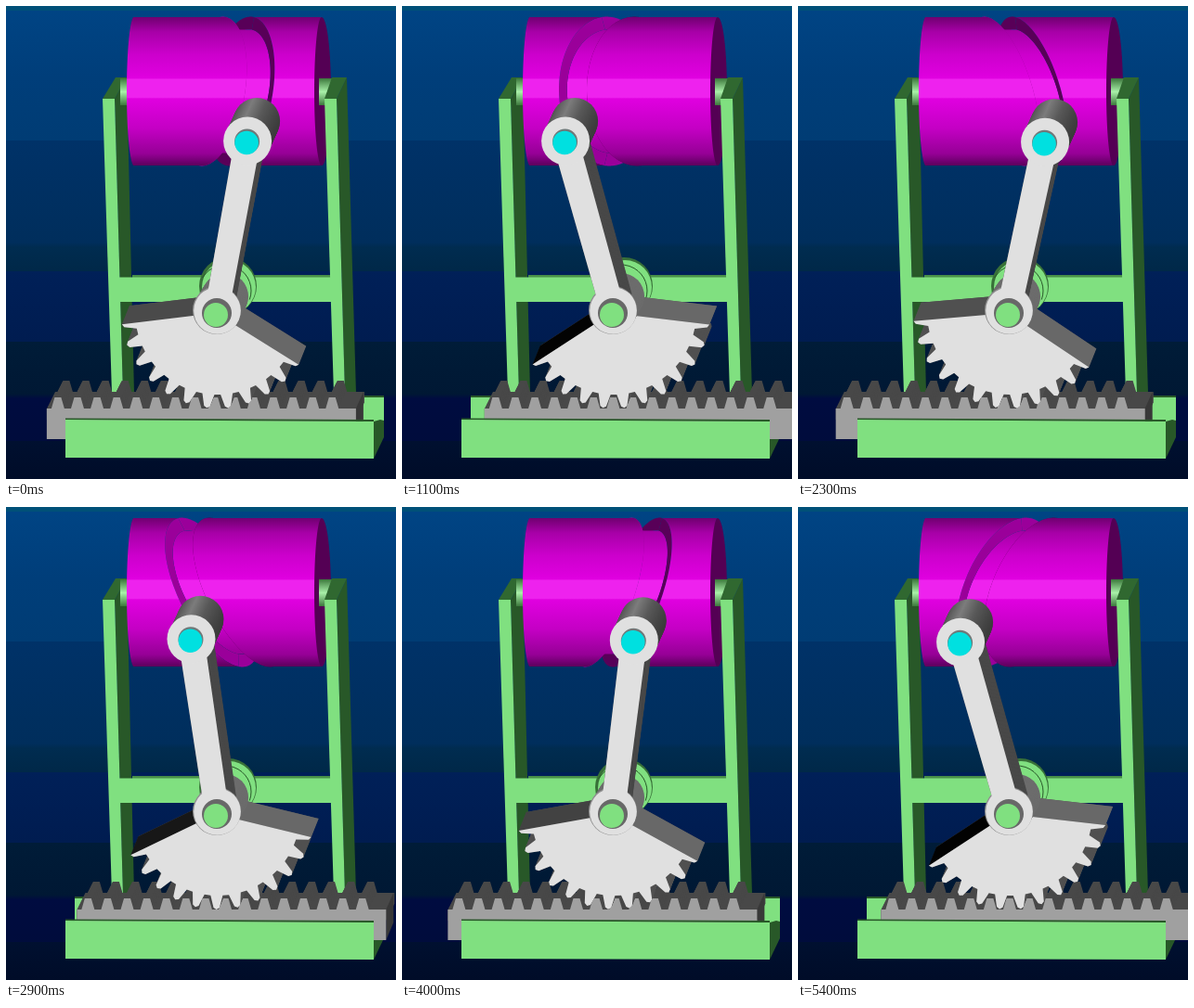
These frames come from a looping animation (420x510 px, 5.5 s). An HTML page with a canvas:

```html
<!DOCTYPE html>
<html lang="en">
<head>
<meta charset="utf-8">
<title>Cylindrical cam and rack</title>
<style>
html, body { margin: 0; width: 100%; height: 100%; overflow: hidden; background: #002850; }
canvas { display: block; }
</style>
</head>
<body>
<canvas width="420" height="510"></canvas>
<script>
const ctx = document.querySelector('canvas').getContext('2d');
const GREEN = '#80e080', DARK_GREEN = '#285828', LIGHT = '#e0e0e0', DARK = '#484848';
const PIVOT = { x: 226, y: 331 }, SECTOR = { x: 228, y: 330 };
const PITCH = 21.1, TOOTH_ANGLE = 12.7;
const rad = deg => deg * Math.PI / 180;
const gray = v => `rgb(${v},${v},${v})`;

function gradient(x0, y0, x1, y1, stops) {
  const g = ctx.createLinearGradient(x0, y0, x1, y1);
  stops.forEach(([at, color]) => g.addColorStop(at, color));
  return g;
}
function poly(points, color) {
  ctx.fillStyle = color;
  ctx.beginPath();
  points.forEach(([x, y]) => ctx.lineTo(x, y));
  ctx.fill();
}
function ellipse(x, y, rx, ry, color) {
  ctx.fillStyle = color;
  ctx.beginPath();
  ctx.ellipse(x, y, rx, ry, 0, 0, 7);
  ctx.fill();
}
const disc = (x, y, r, color) => ellipse(x, y, r, r, color);
const rect = (x, y, w, h, color) => { ctx.fillStyle = color; ctx.fillRect(x, y, w, h); };

// Sweep a shape backwards by (dx, dy) to give it depth.
function extrude(dx, dy, draw) {
  for (let i = 24; i >= 0; i--) {
    ctx.save();
    ctx.translate(dx * i / 24, dy * i / 24);
    draw();
    ctx.restore();
  }
}

const sky = gradient(0, 0, 0, 510, [
  [0, '#005078'], [.01, '#005078'], [.01, '#004484'], [.15, '#003e7a'], [.285, '#003c74'],
  [.285, '#003268'], [.5, '#002e5c'], [.51, '#002c50'], [.56, '#002848'], [.56, '#002058'],
  [.71, '#001c50'], [.71, '#001c38'], [.82, '#001834'], [.83, '#000c40'], [.92, '#000c3c'],
  [.92, '#001030'], [1, '#000c28']]);
const magenta = gradient(0, 12, 0, 172, [
  [0, '#700070'], [.1, '#a800a8'], [.25, '#cc00cc'], [.41, '#e000e0'], [.42, '#ee22ee'],
  [.54, '#ee22ee'], [.55, '#e000e0'], [.75, '#c400c4'], [.92, '#960096'], [1, '#5c005c']]);
const axle = gradient(0, 78, 0, 107, [[0, '#3c783c'], [.5, '#a8f0a8'], [1, '#3c783c']]);

function drawPost(x, topShift, topWidth) {
  const back = x + topShift;
  poly([[x + 13, 100], [back + topWidth, 77], [x + 34, 418], [x + 22, 418]], DARK_GREEN);
  poly([[x, 100], [back, 77], [back + topWidth, 77], [x + 13, 100]], '#306830');
  poly([[x, 100], [x + 13, 100], [x + 22, 418], [x + 10, 418]], GREEN);
}

function drawCrossbar() {
  rect(136, 290, 218, 3, '#489048');
  rect(122, 292.5, 234, 26.5, GREEN);
  disc(239, 302, 31, '#387038');
  disc(240, 303, 29, GREEN);
  ctx.strokeStyle = DARK_GREEN;
  ctx.beginPath();
  ctx.arc(236, 307, 28, rad(-150), rad(20));
  ctx.stroke();
}

function drawCam(phase) {
  const offset = rad(17), horizon = 84, halfGroove = 15;
  const arc = (from, to) => Array.from({ length: 61 }, (_, i) => rad(from + (to - from) * i / 60));
  const front = arc(-horizon, horizon);
  const height = a => 92 + 80 * Math.sin(a) / Math.sin(rad(horizon));
  const center = a => 237 - 8 * Math.cos(a) + 45 * Math.cos(phase - a + offset);
  const lip = (angles, side) => angles.map(a => [center(a) + side * halfGroove, height(a)]);
  const sink = points => points.map(([x, y]) => [232 + (x - 230) * .89, 92 + (y - 92) * .83]);
  const end = x => front.map(a => [x - 8 * Math.cos(a), height(a)]).reverse();
  const wall = (angles, side) => {
    const edge = lip(angles, side);
    poly([...edge, ...sink(edge).reverse()], side < 0 ? '#9a009a' : '#580058');
  };

  // Walls that curl over the far side show above the groove floor.
  for (const angles of [arc(-140, -horizon), arc(horizon, 140)]) {
    wall(angles, 1);
    wall(angles, -1);
  }
  const left = lip(front, -1), right = lip(front, 1);
  poly([...sink(left), ...sink(right).reverse()], magenta);
  wall(front, -1);
  wall(front, 1);
  poly([...left, ...end(138)], magenta);
  ellipse(340, 92, 10, 80, '#540054');
  poly([...right, ...end(340)], magenta);
}

function drawRack(left) {
  const profile = [[left, 434]];
  for (let k = 0; k < 15; k++) {
    const tip = left + 12 + PITCH * k;
    profile.push([tip - 7, 434], [tip - 3.5, 422], [tip + 3.5, 422], [tip + 7, 434]);
  }
  profile.push([left + 333, 434], [left + 333, 446]);
  extrude(9, -18, () => poly([...profile, [left, 446]], DARK));
  poly([[left + 333, 434], [left + 341, 416], [left + 341, 448], [left + 333, 467]], '#383838');
  poly([...profile, [left + 333, 467], [left, 467]], '#a0a0a0');
}

function drawSector(tilt) {
  const turn = tilt + 2.7;
  const at = (deg, r) => [SECTOR.x + r * Math.cos(rad(deg)), SECTOR.y + r * Math.sin(rad(deg))];
  let rim = [];
  for (let k = 0; k < 12; k++) {
    const tip = 20.15 + TOOTH_ANGLE * k + turn;
    rim.push(at(tip - 4.2, 89), at(tip - 1.8, 102), at(tip, 104), at(tip + 1.8, 102), at(tip + 4.2, 89));
  }
  rim = rim.slice(2, -2);
  const hub = [PIVOT.x, PIVOT.y], dx = 8, dy = -20;
  const side = (corner, color) => poly(
    [hub, corner, [corner[0] + dx, corner[1] + dy], [hub[0] + dx, hub[1] + dy]], color);
  extrude(dx, dy, () => poly([hub, ...rim], '#505050'));
  side(rim[rim.length - 1], gray(46 + 2.8 * tilt));
  side(rim[0], gray(104));
  poly([hub, ...rim], LIGHT);
}

function drawArm(x, y) {
  extrude(9, -15, () => disc(227, 328, 25, '#6c6c6c'));
  const dx = x + 1 - 227, dy = y - 328, len = Math.hypot(dx, dy);
  const nx = -dy / len, ny = dx / len;
  const shape = [[227 - 13 * nx, 328 - 13 * ny], [x + 1 - 14 * nx, y - 14 * ny],
    [x + 1 + 14 * nx, y + 14 * ny], [227 + 13 * nx, 328 + 13 * ny]];
  extrude(8, -14, () => poly(shape, DARK));

  const sleeve = gradient(x - 24, y - 10, x + 33, y + 4, [
    [0, '#4c4c4c'], [.3, '#7c7c7c'], [.55, '#585858'], [1, '#303030']]);
  extrude(10, -22, () => disc(x + 1, y, 25, sleeve));
  disc(227, 328, 26, '#909090');
  disc(227.5, 328.5, 25.3, LIGHT);
  poly(shape, LIGHT);
  disc(x + 1, y - .5, 26, LIGHT);
  disc(x + .5, y, 13.5, '#707878');
  disc(x, y + 1.5, 12.8, '#00e0e0');
  disc(227, 331, 16, '#686868');
  disc(226, 333, 13, GREEN);
}

function drawChannel() {
  rect(74, 420, 333, 3, DARK_GREEN);
  rect(74, 422, 333, 26, GREEN);
  poly([[396, 448], [403, 446], [407, 447], [407, 465], [396, 488]], DARK_GREEN);
}

function drawFrontPlate() {
  poly([[64, 446], [396, 448], [396, 488], [64, 487]], GREEN);
  poly([[64, 444.5], [396, 446], [396, 448], [64, 446]], DARK_GREEN);
}

function render(now) {
  const step = Math.floor(now % 5500 / 100);
  const phase = 2 * Math.PI * (step - 1.8) / 20.55;
  const x = 219.3 + 46.7 * Math.cos(phase);
  const y = 142 + 4 * ((x - 217) / 42) ** 2;
  const tilt = Math.atan2(x - PIVOT.x, PIVOT.y - y) * 180 / Math.PI;

  rect(0, 0, 420, 510, sky);
  drawPost(104, 14, 12);
  drawCrossbar();
  rect(123, 78, 14, 29, axle);
  drawCam(phase);
  rect(337, 78, 16, 29, axle);
  drawPost(343, 8, 16);
  drawChannel();
  drawRack(66.4 - .535 * (x - 217));
  drawSector(tilt);
  drawArm(x, y);
  drawFrontPlate();
  requestAnimationFrame(() => render(performance.now()));
}
render(0);
</script>
</body>
</html>
```
